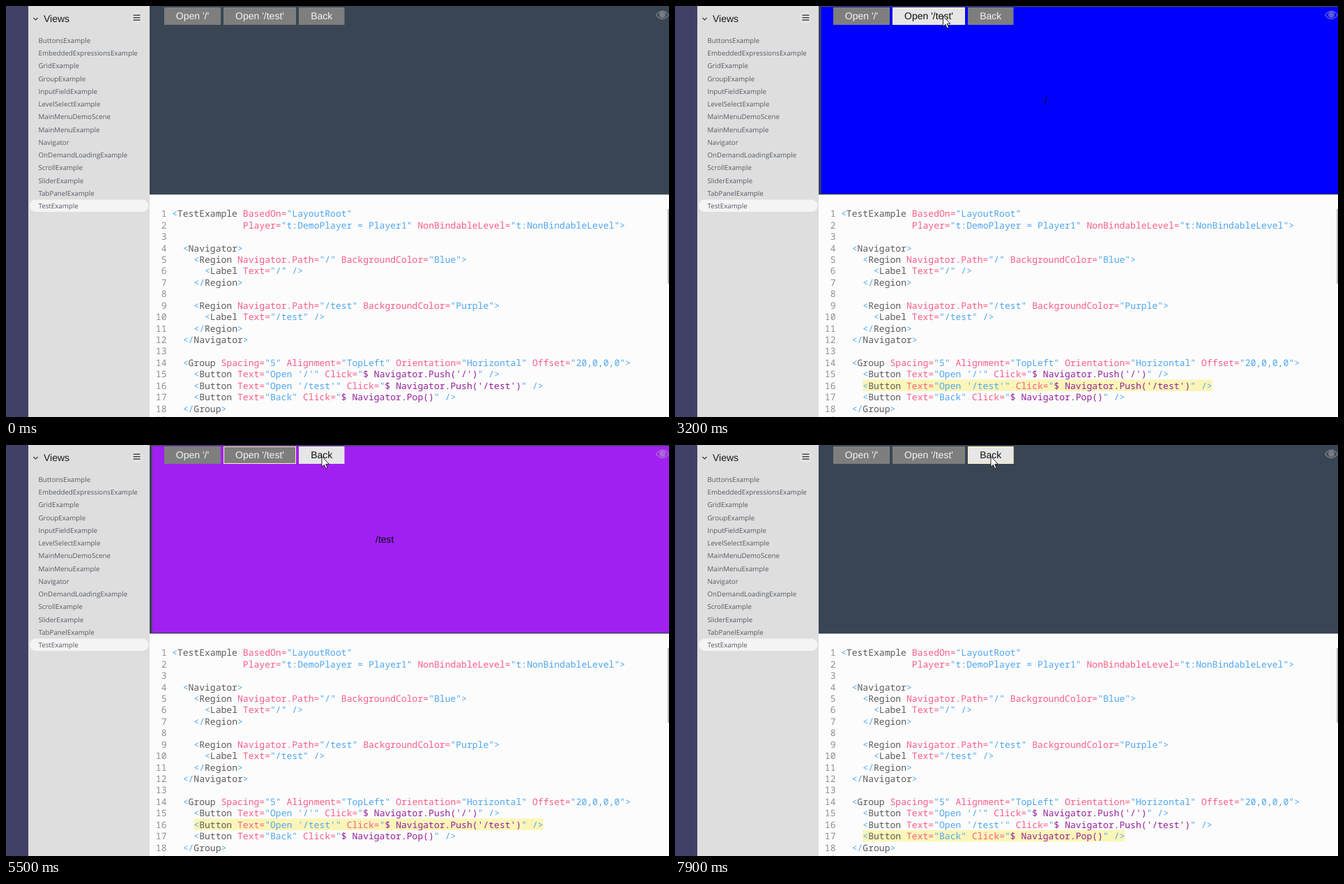
An HTML page with a canvas that plays this animation: 951x589 px, repeating every 8000 ms.

```html
<!DOCTYPE html>
<html lang="en">
<head>
<meta charset="utf-8">
<title>Navigator demo</title>
<style>
  html, body { margin: 0; width: 100%; height: 100%; overflow: hidden; }
  canvas { display: block; width: 100vw; height: 100vh; }
</style>
</head>
<body>
<canvas id="stage" width="951" height="589"></canvas>
<script>
const ctx = document.getElementById('stage').getContext('2d');
const LOOP = 8000, STEP = 100;

const SANS = '"Liberation Sans", Arial, sans-serif';
const LIST = '"Open Sans", "Noto Sans", sans-serif';
const MONO = '"Noto Sans Mono", monospace';
const CHAR = 7.833, CODE_X = 238, CODE_Y = 302.2, LINE = 16.44;

const C = {
  rail: '#414066', side: '#dedede', pill: '#f4f4f4', dark: '#3a4554',
  paper: '#fcfcfc', item: '#555b63', tag: '#5b5b5b', punct: '#4ea6f0',
  attr: '#fa5c86', expr: '#93209a', num: '#8e8e8e', mark: '#fbf6b8',
  blue: '#0000ff', purple: '#a020f0', ring: '#fff3b8'
};

const views = ['ButtonsExample', 'EmbeddedExpressionsExample', 'GridExample',
  'GroupExample', 'InputFieldExample', 'LevelSelectExample', 'MainMenuDemoScene',
  'MainMenuExample', 'Navigator', 'OnDemandLoadingExample', 'ScrollExample',
  'SliderExample', 'TabPanelExample', 'TestExample'];

const code = `<TestExample BasedOn="LayoutRoot"
             Player="t:DemoPlayer = Player1" NonBindableLevel="t:NonBindableLevel">

  <Navigator>
    <Region Navigator.Path="/" BackgroundColor="Blue">
      <Label Text="/" />
    </Region>

    <Region Navigator.Path="/test" BackgroundColor="Purple">
      <Label Text="/test" />
    </Region>
  </Navigator>

  <Group Spacing="5" Alignment="TopLeft" Orientation="Horizontal" Offset="20,0,0,0">
    <Button Text="Open '/'" Click="$ Navigator.Push('/')" />
    <Button Text="Open '/test'" Click="$ Navigator.Push('/test')" />
    <Button Text="Back" Click="$ Navigator.Pop()" />
  </Group>
`.split('\n');

const buttons = [
  { label: "Open '/'", x: 227, w: 81 },
  { label: "Open '/test'", x: 312, w: 104 },
  { label: 'Back', x: 420, w: 65.5 }
];

// Pointer stops: time, x, y
const path = [
  [100, 724, 200], [200, 610, 140], [400, 390, 58], [600, 285, 22], [900, 263.5, 16.5],
  [1500, 263.5, 16.5], [1800, 300, 15], [2100, 362, 12], [2300, 375, 11.5],
  [2400, 379, 13], [2700, 384.5, 14.5], [4700, 384.5, 14.5], [5100, 422, 19],
  [5500, 453, 16.5], [LOOP, 453, 16.5]
];

// Hard state changes; later entries win
const regions = [[0, null], [1000, 'blue'], [3500, 'purple'], [6200, 'blue'], [7900, null]];
const marks = [[0, 0], [800, 15], [3200, 16], [6100, 17]];
const focus = [[0, -1], [800, 0], [3200, 1], [6100, -1], [7700, 2]];

const at = (list, t) => list.filter(e => e[0] <= t).pop()[1];

function pointer(t) {
  if (t < path[0][0]) return null;
  const i = Math.max(1, path.findIndex(p => p[0] >= t));
  const [t0, x0, y0] = path[i - 1], [t1, x1, y1] = path[i];
  const k = (t - t0) / (t1 - t0);
  return { x: x0 + (x1 - x0) * k, y: y0 + (y1 - y0) * k };
}

function rect(color, x, y, w, h) {
  ctx.fillStyle = color;
  ctx.fillRect(x, y, w, h);
}

function text(str, x, y, font, color, align = 'left') {
  ctx.font = font;
  ctx.fillStyle = color;
  ctx.textAlign = align;
  ctx.fillText(str, x, y);
}

function line(points, color, width) {
  ctx.beginPath();
  points.forEach(([x, y]) => ctx.lineTo(x, y));
  ctx.strokeStyle = color;
  ctx.lineWidth = width;
  ctx.stroke();
}

function sidebar() {
  rect(C.rail, 0, 0, 32, 589);
  rect(C.side, 32, 0, 174, 589);
  line([[39.5, 17], [42.5, 20], [45.5, 17]], '#333', 1.1);
  text('Views', 54, 23, '14px ' + SANS, '#1c1c1c');
  ctx.beginPath();
  ctx.arc(187.5, 17, 9, 0, 7);
  ctx.fillStyle = '#e3e3e3';
  ctx.fill();
  for (const y of [13, 16.5, 20]) rect('#333', 182.5, y - 0.5, 10, 1.3);
  ctx.beginPath();
  ctx.roundRect(34, 277.5, 170.5, 17.5, 8.5);
  ctx.fillStyle = C.pill;
  ctx.fill();
  views.forEach((v, i) => text(v, 46.5, 52.7 + i * 18.27, '9.75px ' + LIST, C.item));
}

function tokens(row) {
  const out = [];
  const rule = /(<\/?)([\w.]+)|"(\$[^"]*)"|("[^"]*")|([\w.]+=)|(\/?>)/g;
  for (const m of row.matchAll(rule)) {
    const add = (s, color, shift = 0) => out.push([s, m.index + shift, color]);
    if (m[1]) {
      add(m[1], C.punct);
      add(m[2], C.tag, m[1].length);
    } else if (m[3]) {
      add('"', C.punct);
      add(m[3], C.expr, 1);
      add('"', C.punct, m[3].length + 1);
    } else add(m[0], m[5] ? C.attr : C.punct);
  }
  return out;
}
const tokenRows = code.map(tokens);

function editor(mark) {
  rect(C.paper, 206, 270.5, 745, 318.5);
  if (mark) {
    const row = code[mark - 1], col = row.search(/\S/);
    rect(C.mark, CODE_X + col * CHAR, 519 + (mark - 15) * LINE,
      (row.length - col) * CHAR, 16.5);
  }
  const font = CHAR / 0.6 + 'px ' + MONO;
  tokenRows.forEach((row, i) => {
    const y = CODE_Y + i * LINE;
    text(i + 1, 230.5, y, font, C.num, 'right');
    for (const [s, col, color] of row) text(s, CODE_X + col * CHAR, y, font, color);
  });
  rect('#b9b9b9', 949, 291, 2, 107);
}

function eye() {
  ctx.save();
  ctx.globalAlpha = 0.5;
  ctx.strokeStyle = ctx.fillStyle = '#b4b4b4';
  ctx.lineWidth = 1.4;
  ctx.beginPath();
  ctx.moveTo(932.5, 13);
  ctx.quadraticCurveTo(941.5, 1.5, 950.5, 13);
  ctx.quadraticCurveTo(941.5, 24, 932.5, 13);
  ctx.stroke();
  ctx.beginPath();
  ctx.arc(941.5, 12.5, 4.6, 0, 7);
  ctx.fill();
  ctx.restore();
}

function preview(region, focused, p) {
  rect(C.dark, 206, 0, 745, 270.5);
  if (region) {
    rect(C[region], 209.5, 1.5, 741.5, 267.5);
    text(region === 'blue' ? '/' : '/test', 530, 140, '14px ' + SANS, '#0a0a14');
  }
  eye();
  buttons.forEach((b, i) => {
    const over = p && p.x >= b.x && p.x <= b.x + b.w && p.y < 27;
    rect(over ? '#e6e6e6' : '#7e7e7e', b.x, 2, b.w, 25);
    if (i === focused) {
      ctx.strokeStyle = C.ring;
      ctx.lineWidth = 1;
      ctx.strokeRect(b.x + 0.5, 2.5, b.w - 1, 24);
    }
    text(b.label, b.x + b.w / 2, 19, '14px ' + SANS, over ? '#101010' : '#f4f4f4', 'center');
  });
}

function arrow({ x, y }) {
  ctx.beginPath();
  [[0, 0], [0, 15], [3.4, 11.8], [5.8, 17.2], [8, 16.2], [5.7, 11], [10.4, 10.8]]
    .forEach(([dx, dy]) => ctx.lineTo(x + dx, y + dy));
  ctx.closePath();
  ctx.fillStyle = '#fff';
  ctx.fill();
  ctx.strokeStyle = '#111';
  ctx.lineWidth = 0.9;
  ctx.stroke();
}

function draw(now) {
  const t = Math.floor((now % LOOP) / STEP) * STEP;
  const p = pointer(t);
  ctx.textRendering = 'geometricPrecision';
  sidebar();
  preview(at(regions, t), at(focus, t), p);
  editor(at(marks, t));
  if (p) arrow(p);
}

let start;
function tick(now) {
  start ??= now;
  draw(now - start);
  requestAnimationFrame(tick);
}
requestAnimationFrame(tick);
</script>
</body>
</html>
```
